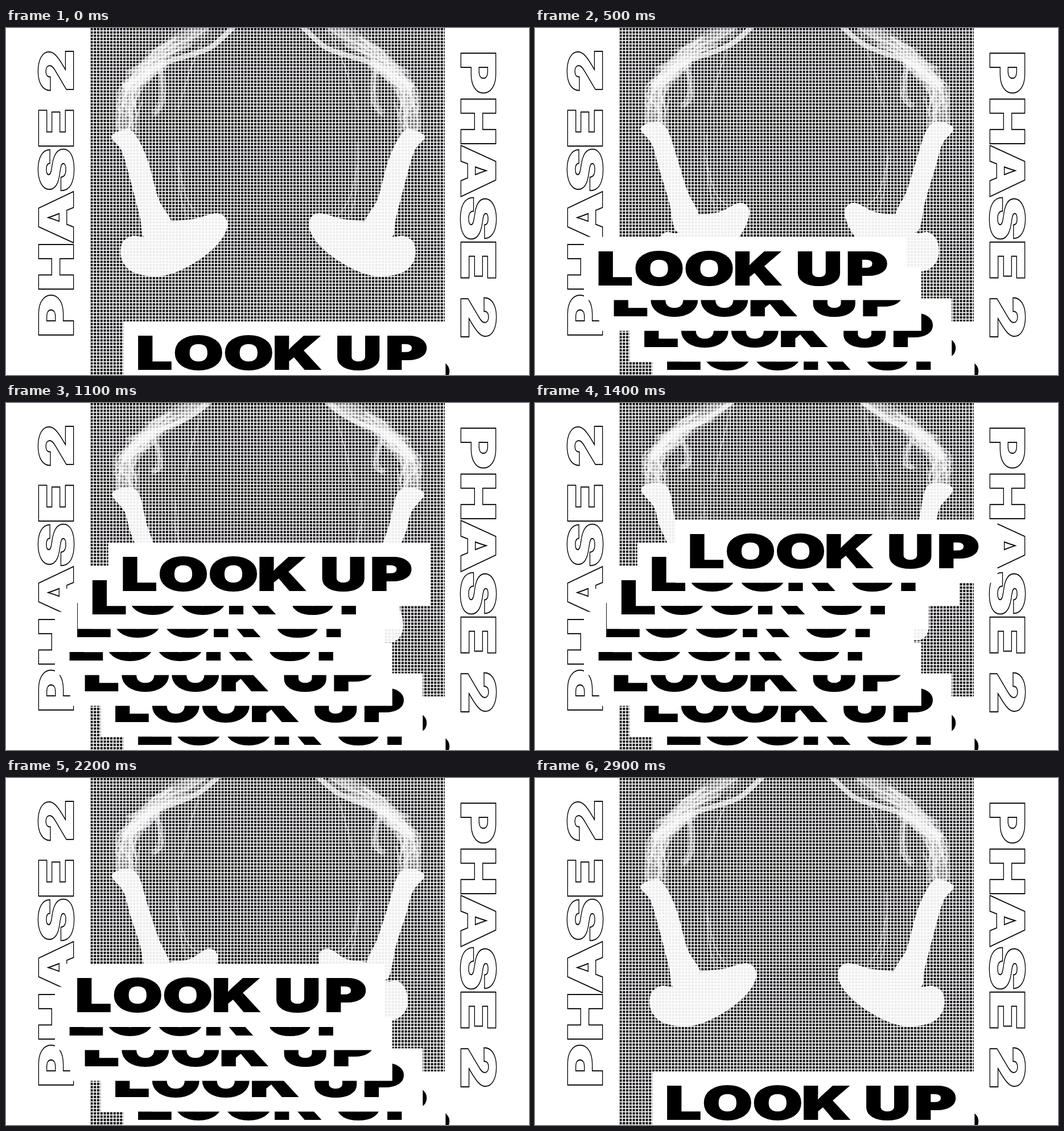
Recreate the animation shown at these times as an HTML page with a canvas. Size 919 by 609 pixels, loop 3000 ms.

```html
<!DOCTYPE html>
<html lang="en">
<head>
<meta charset="utf-8">
<title>Look up</title>
<style>
  html, body { margin: 0; width: 100%; height: 100%; overflow: hidden; background: #fff; }
  canvas, svg { position: absolute; left: 0; top: 0; width: 919px; height: 609px; }
  text {
    font: 900 80px Inter, "Open Sans", sans-serif;
    font-optical-sizing: none;
    text-anchor: middle;
    white-space: pre;
    paint-order: stroke;
    stroke: #000;
    stroke-width: 2px;
  }
  .side { font-size: 82px; fill: #fff; stroke-width: 2.6px; }
</style>
</head>
<body>
<svg id="sides" viewBox="0 0 919 609"></svg>
<canvas width="919" height="609"></canvas>
<svg id="cards" viewBox="0 0 919 609"></svg>
<script>
const LEFT = 148.5, RIGHT = 771, HEIGHT = 609;
const PITCH = 5.75, GAP = 1.6, WIDE = 1.42;
const ctx = document.querySelector('canvas').getContext('2d');

// Expanded lettering: one scale for every word, letters spaced by their centres
const word = (text, centres, place, cls = '') =>
  `<text class="${cls}" transform="${place} scale(${WIDE} 1)" x="${centres.map(c => (c / WIDE).toFixed(1)).join(' ')}">${text}</text>`;

const phase = [36, 122, 209, 292, 365, 413, 466];
document.getElementById('sides').innerHTML =
  word('PHASE 2', phase, 'translate(118 541) rotate(-90)', 'side') +
  word('PHASE 2', phase, 'translate(800 42) rotate(90)', 'side');

const lookUp = [28, 106, 194, 279, 335, 387, 471];
const stepsX = [12, 9, 6, 2, 0, 1, 3, 7, 12];
const stepsY = [0, 3, 6, 10, 14, 17, 20, 23, 26];
const cardBox = document.getElementById('cards');
cardBox.innerHTML = stepsX.map((sx, i) => {
  const x = 112 + sx * 13.38, y = 580.5 - stepsY[i] * 13.5;
  return `<g transform="translate(${x.toFixed(1)} ${y})">
    <rect x="-26" y="-25" width="566" height="111" fill="#fff"/>
    ${word('LOOK UP', lookUp, 'translate(0 59)')}</g>`;
}).join('');
const cards = [...cardBox.children];

// Each shape as [start pose, end pose]
const bell = [
  [[284,342],[330,335],[372,325],[389,342],[378,372],[345,403],[300,428],[262,436],[222,428],[203,405],[204,378],[222,365],[250,366]],
  [[275,318],[318,308],[345,285],[362,294],[355,330],[335,365],[300,398],[265,418],[238,418],[224,400],[226,370],[240,350],[255,350]]
];
const stalk = [
  [[185,190],[203,215],[218,265],[235,330],[245,368],[290,345],[268,300],[250,235],[232,195],[215,178]],
  [[186,160],[208,190],[218,225],[235,270],[255,345],[285,320],[268,270],[248,215],[234,160],[212,148]]
];
const arm = [
  [[210,195],[208,155],[217,120],[232,88],[265,55],[310,22],[350,-8]],
  [[212,172],[207,140],[212,105],[232,74],[262,48],[300,22],[345,-8]]
];
const ribbon = [
  [[206,104],[241,85],[281,61],[321,48],[361,33],[402,-4]],
  [[206,100],[225,78],[258,52],[295,38],[332,18],[362,-6]]
];
const hanging = [
  [[270,65],[276,95],[274,130],[262,152]],
  [[258,62],[270,85],[270,112],[258,122]]
];
const threads = [
  [[[340,334],[318,300],[303,240]], [[350,298],[318,280],[294,205]]],
  [[[318,334],[306,290],[304,200]], [[318,308],[306,265],[298,170]]],
  [[[350,10],[325,70],[303,145]], [[345,10],[328,70],[312,140]]]
];

const blend = ([a, b], p) => a.map(([x, y], i) => [x + (b[i][0] - x) * p, y + (b[i][1] - y) * p]);

function trace(pts, closed) {
  const n = pts.length;
  const at = i => pts[closed ? (i + n) % n : Math.max(0, Math.min(n - 1, i))];
  ctx.beginPath();
  ctx.moveTo(...pts[0]);
  for (let i = 0; i < (closed ? n : n - 1); i++) {
    const [a, b, c, d] = [at(i - 1), at(i), at(i + 1), at(i + 2)];
    ctx.bezierCurveTo(
      b[0] + (c[0] - a[0]) / 6, b[1] + (c[1] - a[1]) / 6,
      c[0] - (d[0] - b[0]) / 6, c[1] - (d[1] - b[1]) / 6, c[0], c[1]);
  }
}

function line(pts, width, alpha) {
  trace(pts);
  ctx.lineWidth = width;
  ctx.strokeStyle = `rgba(240,240,240,${alpha})`;
  ctx.stroke();
}

function fill(pts) {
  trace(pts, true);
  ctx.fillStyle = '#ededed';
  ctx.fill();
}

function random(seed) {
  return () => (seed = (seed * 16807) % 2147483647) / 2147483647;
}

function jelly(p) {
  const rnd = random(4711);
  const spine = blend(arm, p);
  line(spine, 34, .24);
  line(spine, 20, .28);
  for (let k = 0; k < 64; k++) {
    const from = Math.floor(rnd() * 5);
    const strand = spine.slice(from, from + 3)
      .map(([x, y]) => [x + rnd() * 44 - 22, y + rnd() * 34 - 17]);
    line(strand, .7 + rnd() * 4, .12 + rnd() * .4);
  }
  const band = blend(ribbon, p);
  line(band, 9, .75);
  line(band.slice(0, 3), 19, .5);
  line(blend(hanging, p), 8, .35);
  for (let k = 0; k < 8; k++)
    line(blend(hanging, p).map(([x, y]) => [x + rnd() * 18 - 9, y + rnd() * 14 - 7]), 1.5, .35);
  threads.forEach(t => {
    const thread = blend(t, p);
    line(thread, 1.8, .45);
    line(thread.map(([x, y], i) => [x + 5 - i * 5, y]), 1, .35);
  });
  fill(blend(stalk, p));
  fill(blend(bell, p));
}

function water() {
  const g = ctx.createLinearGradient(0, 0, 0, HEIGHT);
  for (let i = 0; i <= 8; i++) g.addColorStop(i / 8, i % 2 ? '#171219' : '#10140f');
  ctx.fillStyle = g;
  ctx.fillRect(LEFT, 0, RIGHT - LEFT, HEIGHT);
}

function grid() {
  ctx.fillStyle = '#fff';
  for (let x = LEFT + PITCH - GAP; x < RIGHT; x += PITCH) ctx.fillRect(x, 0, GAP, HEIGHT);
  for (let y = PITCH - GAP; y < HEIGHT; y += PITCH) ctx.fillRect(LEFT, y, RIGHT - LEFT, GAP);
}

let last = -1;
function draw(now) {
  const tick = Math.floor(now / 100) % 30;
  const step = Math.min(tick, 29 - tick); // forward, then back
  if (step !== last) {
    last = step;
    ctx.clearRect(0, 0, 919, HEIGHT);
    ctx.save();
    ctx.beginPath();
    ctx.rect(LEFT, 0, RIGHT - LEFT, HEIGHT);
    ctx.clip();
    water();
    jelly(step / 11);
    ctx.save();
    ctx.translate(921, 0);
    ctx.scale(-1, 1);
    jelly(step / 11);
    ctx.restore();
    grid();
    ctx.restore();
    const shown = 2 + Math.floor((step + 1) / 2);
    cards.forEach((card, i) => card.style.display = i < shown ? '' : 'none');
  }
  requestAnimationFrame(() => draw(performance.now()));
}
draw(performance.now());
</script>
</body>
</html>
```
